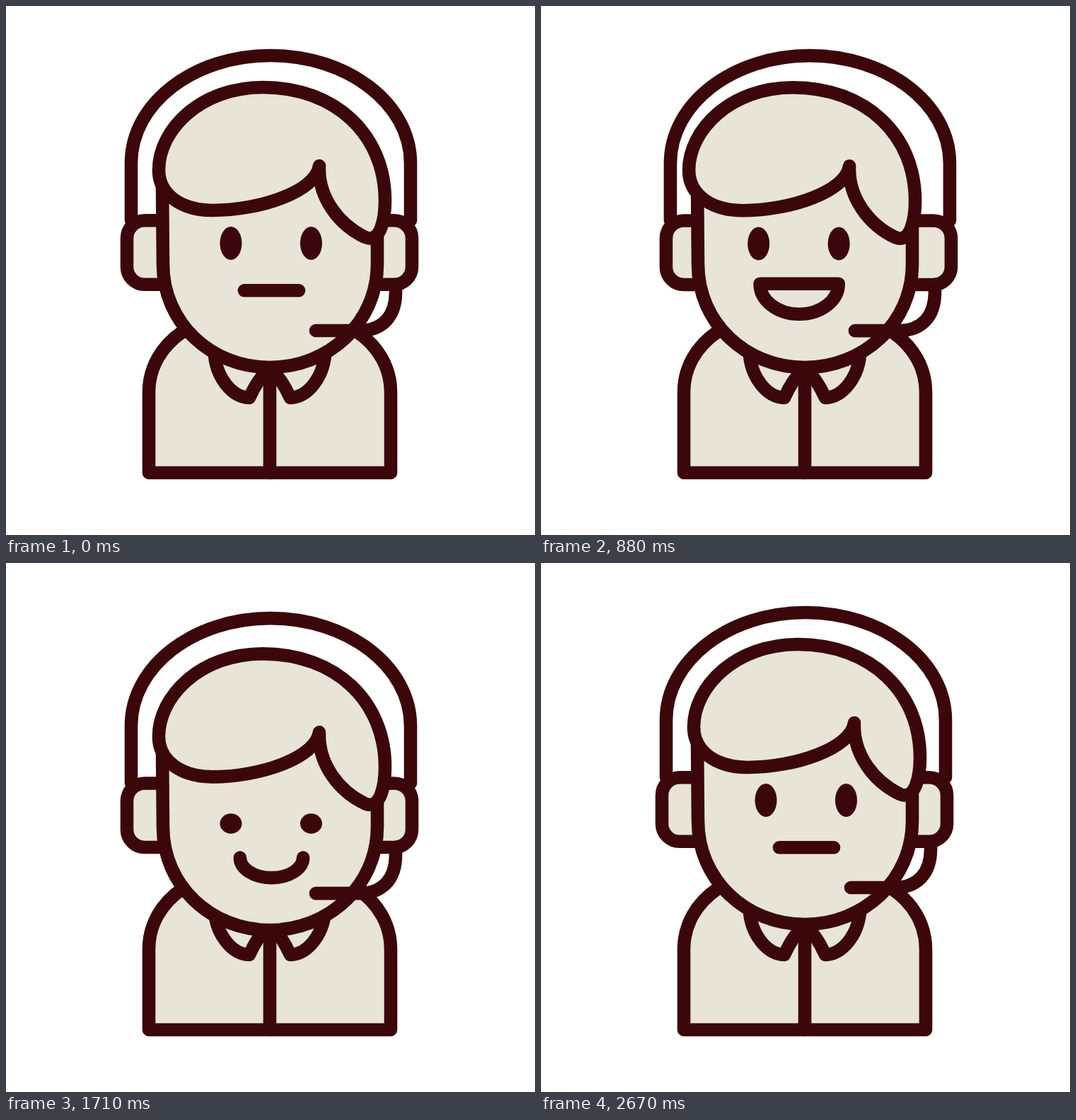
Write an HTML page that moves like this. It is 748 px wide and 748 px high and loops after 2.71 s.

```html
<!DOCTYPE html>
<html lang="en">
<head>
<meta charset="utf-8">
<title>Support agent</title>
<style>
  html, body { margin: 0; width: 100%; height: 100%; overflow: hidden; background: #fff; }
  svg { display: block; width: 100%; height: 100%; }
  .line { fill: #e8e4d8; stroke: #3b070a; stroke-width: 18.6; stroke-linecap: round; stroke-linejoin: round; }
  .open { fill: none; }
  #eyes { fill: #3b070a; }
</style>
</head>
<body>
<svg viewBox="0 0 748 748">
  <g class="line">
    <path d="M202 660V546C202 511 220 481 249 461L373 430L497 461C526 481 544 511 544 546V660Z"/>
    <path d="M373 515V660"/>
    <path id="collar" d="M295 494C298 524 318 553 344 554C349 543 357 527 370 515"/>
    <use href="#collar" transform="matrix(-1 0 0 1 746 0)"/>
  </g>
  <g id="headset" class="line">
    <path class="open" d="M177 303V222C177 138 265 70 374 70S572 138 572 222V303"/>
    <rect x="171" y="303.3" width="403" height="90.5" rx="25"/>
  </g>
  <path id="face" class="line" d="M221 250L222 365C222 448 290 511 373 511S525 448 525 365V240"/>
  <path id="hair" class="line" d="M443 226C441 272 472 310 508 327C530 336 536 300 536 275C536 183 467 115 363 115C275 115 216 175 216 232C216 268 250 289 292 289C360 289 438 262 443 226Z"/>
  <g id="eyes">
    <ellipse cx="318" cy="335.5" rx="15.5" ry="23.5"/>
    <ellipse cx="431.5" cy="335.5" rx="15.5" ry="23.5"/>
  </g>
  <path id="mouth" class="line"/>
  <path id="mic" class="line open" d="M551 394V405C551 438 533 459 500 459H438"/>
</svg>
<script>
const LOOP = 2710, FPS = 24;
const $ = id => document.getElementById(id);
const move = (id, x, y) => $(id).setAttribute('transform', `translate(${x} ${y})`);

// Smooth 0 to 1 between two frames
const ease = (f, from, to) => {
  const p = Math.min(1, Math.max(0, (f - from) / (to - from)));
  return p * p * (3 - 2 * p);
};
// Rise, hold, fall
const pulse = (f, a, b, c, d) => ease(f, a, b) - ease(f, c, d);

function draw(now) {
  const f = Math.floor((now % LOOP + 5) * FPS / 1000);
  const turn = pulse(f, 0, 15, 20, 35);
  const nod = pulse(f, 20, 35, 36.5, 50);
  const laugh = pulse(f, 6, 13, 18, 26);
  const smile = pulse(f, 28, 34, 37, 46);
  const lift = f < 15 ? -1.5 * Math.sin(Math.PI * turn) : 0;

  move('headset', 6 * turn, 11 * nod);
  move('mic', 6 * turn, 11 * nod);
  move('face', 0, 11 * nod);
  move('hair', -7 * turn, 18 * nod);

  move('eyes', -10.5 * turn, 44.5 * nod + lift);
  for (const eye of $('eyes').children) eye.setAttribute('ry', 23.5 - 16 * smile);

  const x = 375.5 - 10.5 * turn;
  const y = 402.3 + 24 * nod + lift - 14.5 * laugh - 6 * smile;
  const w = 38.5 + 25 * laugh + 10.5 * smile;
  const depth = 63 * laugh + 49 * smile;
  $('mouth').setAttribute('d',
    `M${x - w} ${y}A${w} ${depth} 0 0 0 ${x + w} ${y}${laugh > 0 ? 'Z' : ''}`);

  requestAnimationFrame(() => draw(performance.now() - start));
}
const start = performance.now();
draw(0);
</script>
</body>
</html>
```
